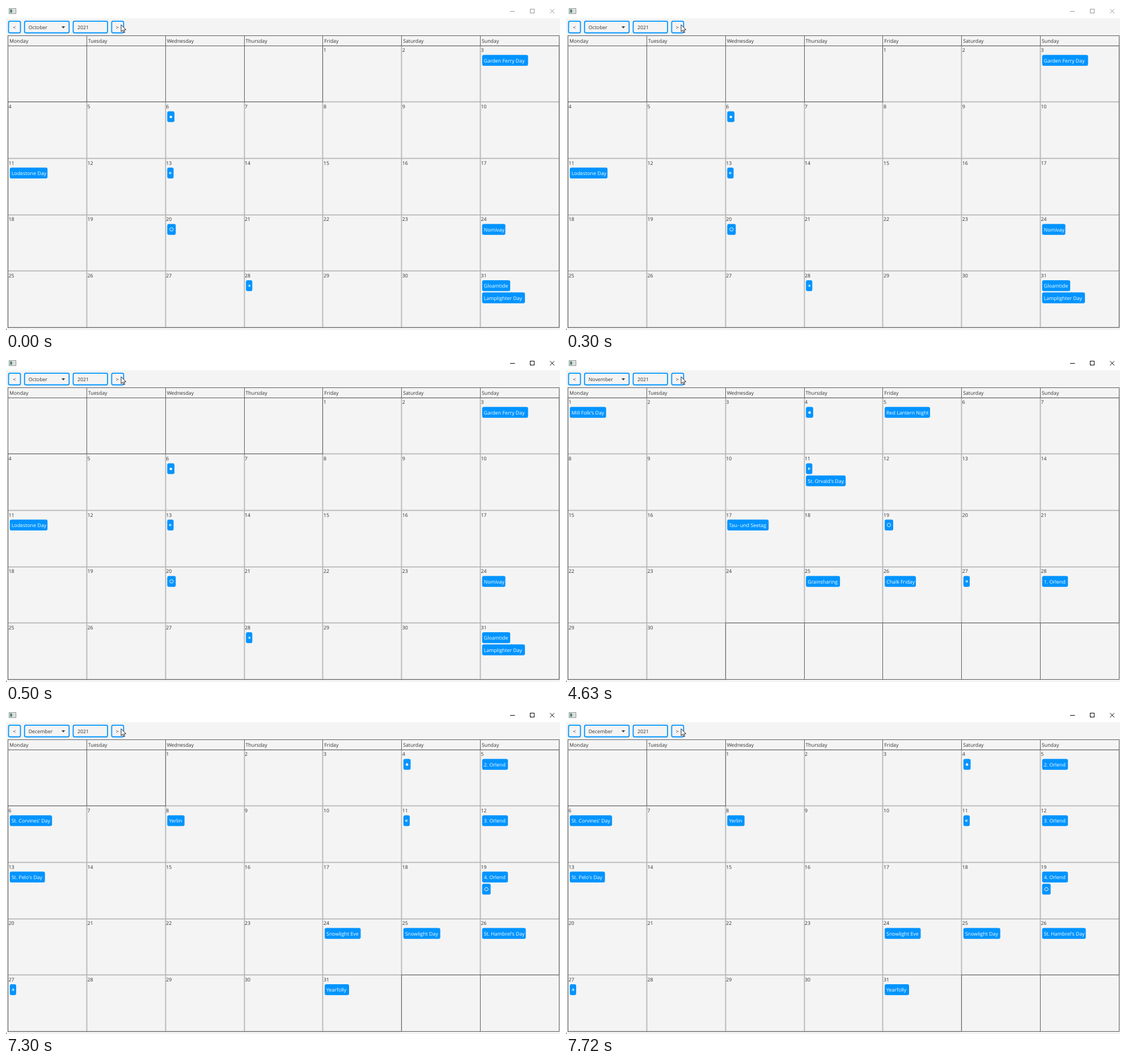
An HTML page for the animation above (8000 ms loop, 977 px wide and 573 px high).

```html
<!DOCTYPE html>
<html lang="en">
<head>
<meta charset="utf-8">
<title>Calendar</title>
<style>
  html, body { margin: 0; width: 100%; height: 100%; overflow: hidden; background: #f4f4f4; }
  svg { display: block; width: 977px; height: 573px; }
  text { font: 8.8px "Open Sans", "Noto Sans", sans-serif; fill: #333; text-rendering: geometricPrecision; }
  .badge text { fill: #fff; }
  .badge rect { fill: #0094ff; }
  .field { fill: none; stroke: #0094ff; stroke-width: 1.8; }
  .light { fill: none; stroke: #b9b9b9; stroke-width: 1.5; }
  .dark { fill: none; stroke: #5c5c5c; }
  .month { visibility: hidden; animation: 8s step-end infinite; }
  #m0 { animation-name: october; }
  #m1 { animation-name: november; }
  #m2 { animation-name: december; }
  #controls { fill: none; stroke: #000; animation: focus 8s step-end infinite; }
  @keyframes october { 0% { visibility: visible } 7.75%, 100% { visibility: hidden } }
  @keyframes november { 0% { visibility: hidden } 7.75% { visibility: visible } 91.25%, 100% { visibility: hidden } }
  @keyframes december { 0% { visibility: hidden } 91.25%, 100% { visibility: visible } }
  @keyframes focus { 0% { stroke: #999 } 6.25%, 100% { stroke: #000 } }
</style>
</head>
<body>
<svg id="stage" viewBox="0 0 977 573">
  <rect width="977" height="573" fill="#f4f4f4"/>
  <rect width="977" height="21.5" fill="#fff"/>
  <rect y="571" width="1" height="2" fill="#444"/>

  <g id="icon">
    <rect x="5.5" y="4.5" width="12" height="9" fill="#f2f2f2" stroke="#8b8b8b"/>
    <rect x="7" y="6" width="4" height="6" fill="#4b8f80"/>
    <rect x="12" y="6" width="4" height="6" fill="#d8d8d8"/>
  </g>
  <g id="controls">
    <path d="M889 9.5h8.5"/>
    <rect x="924.5" y="5.5" width="7" height="7"/>
    <path d="M959.5 5.5l7.5 7.5m0-7.5l-7.5 7.5"/>
  </g>

  <g class="field">
    <rect x="4.5" y="26.9" width="21" height="20.6" rx="2.5"/>
    <rect x="32.7" y="26.9" width="78.6" height="20.6" rx="2.5"/>
    <rect x="118.5" y="26.9" width="60.6" height="20.6" rx="2.5"/>
    <rect x="186.4" y="26.9" width="21" height="20.6" rx="2.5"/>
  </g>
  <text x="12.3" y="40.6">&lt;</text>
  <text x="126" y="40.6">2021</text>
  <text x="193.8" y="40.6">&gt;</text>
  <path d="M98 36h6.2l-3.1 3.4z" fill="#333"/>

  <g id="grid"></g>
  <path d="M203 33.2v12.2l2.9-2.7 2 4.5 1.9-.9-2-4.3h3.8z" fill="#fff" stroke="#111" stroke-width=".9"/>
</svg>
<script>
  const NS = "http://www.w3.org/2000/svg";
  const days = ["Monday", "Tuesday", "Wednesday", "Thursday", "Friday", "Saturday", "Sunday"];

  // Events: [day, label or moon phase, badge width]
  const months = [
    { name: "October", skip: 4, length: 31, events: [
      [3, "Garden Ferry Day", 81], [6, "new"], [11, "Lodestone Day", 66.5], [13, "first"],
      [20, "full"], [24, "Nomivay", 41], [28, "last"], [31, "Gloamtide", 49.5], [31, "Lamplighter Day", 75.5]] },
    { name: "November", skip: 0, length: 30, events: [
      [1, "Mill Folk's Day", 64], [4, "new"], [5, "Red Lantern Night", 80], [11, "first"],
      [11, "St. Orvald's Day", 70], [17, "Tau- und Seetag", 73], [19, "full"],
      [25, "Grainsharing", 60], [26, "Chalk Friday", 55], [27, "last"], [28, "1. Orlend", 45.5]] },
    { name: "December", skip: 2, length: 31, events: [
      [4, "new"], [5, "2. Orlend", 45.5], [6, "St. Corvines' Day", 74.5], [8, "Yerlin", 30.5],
      [11, "first"], [12, "3. Orlend", 45.5], [13, "St. Pelo's Day", 62], [19, "4. Orlend", 45.5],
      [19, "full"], [24, "Snowlight Eve", 63.5], [25, "Snowlight Day", 65],
      [26, "St. Hambrel's Day", 77], [27, "last"], [31, "Yearfolly", 43]] }
  ];
  const moonWidth = { new: 12.7, first: 11.2, full: 15, last: 11.2 };

  const grid = document.getElementById("grid");
  const colX = c => 3.6 + 138.83 * c;
  const rowY = r => 70.3 + 99.65 * r;
  const snap = v => Math.floor(v) + 0.5;

  function add(parent, tag, attrs, label) {
    const el = document.createElementNS(NS, tag);
    for (const key in attrs) el.setAttribute(key, attrs[key]);
    if (label) el.textContent = label;
    return parent.appendChild(el);
  }

  function box(parent, c, r, cls) {
    const x = snap(colX(c)), y = snap(rowY(r));
    add(parent, "rect", { x, y, width: snap(colX(c + 1)) - x, height: snap(rowY(r + 1)) - y, class: cls });
  }

  function moon(parent, phase, x, y) {
    if (phase === "new") return add(parent, "circle", { cx: x, cy: y + 0.4, r: 2.2, fill: "#fff" });
    const full = phase === "full", r = full ? 3.1 : 1.8;
    add(parent, "circle", { cx: x, cy: y, r, fill: "none", stroke: "#fff", "stroke-width": full ? 0.9 : 0.6 });
    if (full) return;
    const sweep = phase === "first" ? 0 : 1;
    add(parent, "path", { d: `M${x} ${y - r}a${r} ${r} 0 0 ${sweep} 0 ${2 * r}z`, fill: "#fff" });
  }

  function badge(parent, c, r, slot, label, width) {
    const g = add(parent, "g", { class: "badge" });
    const x = colX(c) + 3.1, y = rowY(r) + 16.2 + 21.5 * slot;
    const phase = moonWidth[label];
    const w = phase || width;
    add(g, "rect", { x, y, width: w, height: 19.2, rx: 3 });
    if (phase) moon(g, label, x + w / 2, y + 9.6);
    else add(g, "text", { x: x + 3.1, y: y + 13.1 }, label);
  }

  function drawMonth(m, i) {
    const g = add(grid, "g", { id: "m" + i, class: "month" });
    add(g, "text", { x: 39.7, y: 40.6 }, m.name);
    const cells = [...Array(35).keys()].map(n => ({ c: n % 7, r: Math.floor(n / 7), day: n - m.skip + 1 }));
    const isDay = cell => cell.day > 0 && cell.day <= m.length;
    cells.filter(isDay).forEach(({ c, r, day }) => {
      box(g, c, r, "light");
      add(g, "text", { x: colX(c) + 1, y: rowY(r) + 10.9 }, day);
    });
    cells.filter(cell => !isDay(cell)).forEach(({ c, r }) => box(g, c, r, "dark"));

    const used = {};
    for (const [day, label, width] of m.events) {
      const { c, r } = cells[day + m.skip - 1];
      const slot = used[day] || 0;
      used[day] = slot + 1;
      badge(g, c, r, slot, label, width);
    }
  }

  months.forEach(drawMonth);
  add(grid, "rect", { x: 3.5, y: 52.5, width: 972, height: 516, class: "dark" });
  add(grid, "path", { d: "M3.5 70.5h972", class: "dark" });
  days.forEach((day, c) => {
    if (c) add(grid, "path", { d: `M${snap(colX(c))} 52.5v18`, class: "dark" });
    add(grid, "text", { x: colX(c) + 2.4, y: 65.2 }, day);
  });
</script>
</body>
</html>
```
